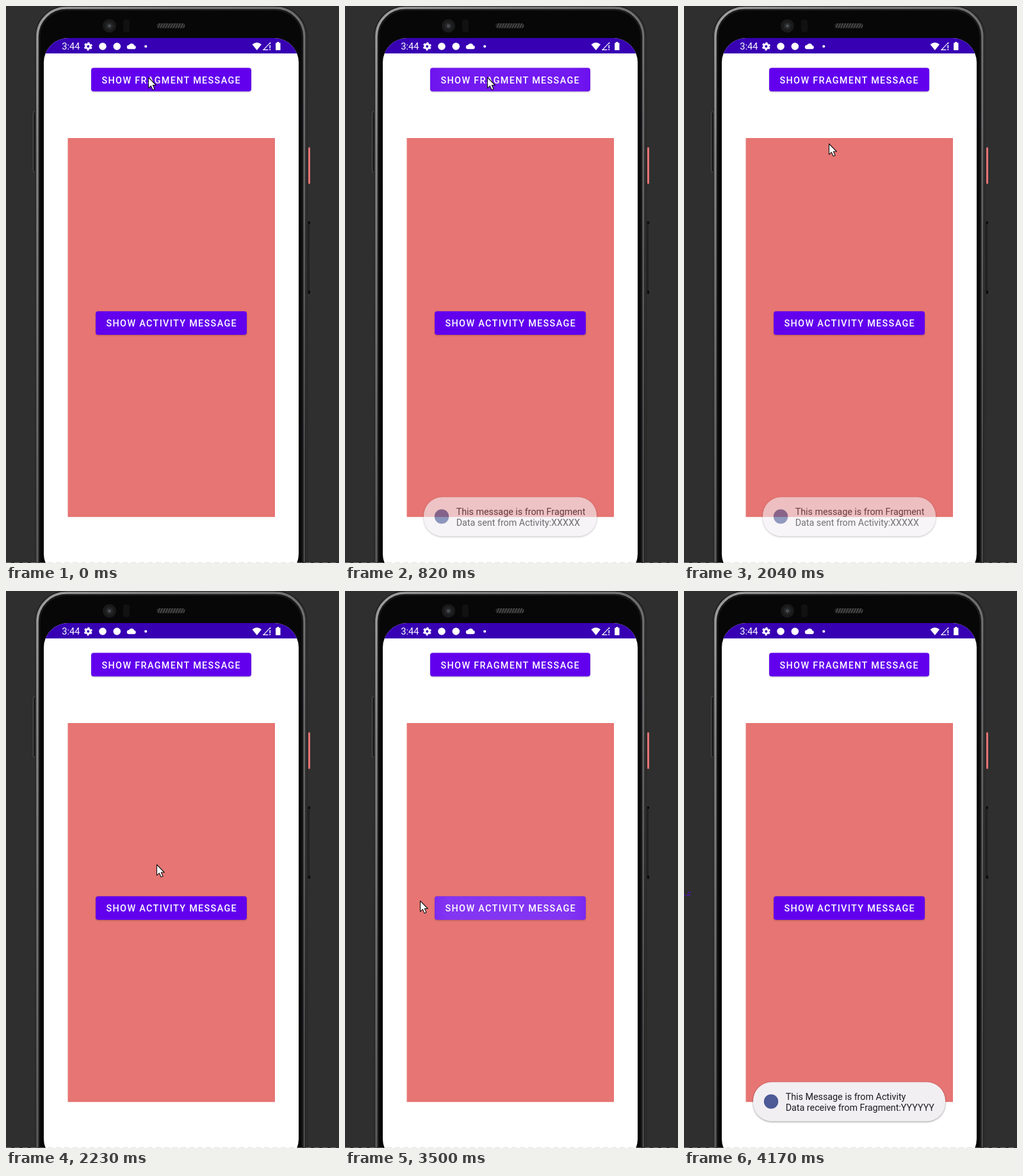
Recreate the animation shown at these times as an HTML page. Size 520 by 869 pixels, loop 5.28 s.

```html
<!DOCTYPE html>
<html lang="en">
<head>
<meta charset="utf-8">
<title>Fragment and activity messages</title>
<style>
  html, body { margin: 0; width: 100%; height: 100%; overflow: hidden; background: #2f2f2f; }
  svg { display: block; width: 520px; height: 869px; font-family: Roboto, sans-serif; }
  .label { font-size: 14.4px; font-weight: 500; letter-spacing: 1.34px; fill: #fff; }
  .toast text { font-size: 14.3px; fill: #1d1b20; }
  .toast rect { fill: #f2eff3; filter: drop-shadow(0 1px 1.5px rgba(0, 0, 0, .4)); }
  .icons { fill: #fff; }
</style>
</head>
<body>
<svg viewBox="0 0 520 869">
  <defs>
    <linearGradient id="metal" x2=".5" y2="1">
      <stop stop-color="#a0a0a0"/><stop offset=".2" stop-color="#808080"/>
      <stop offset=".5" stop-color="#686868"/><stop offset="1" stop-color="#444"/>
    </linearGradient>
    <pattern id="mesh" width="4" height="4" patternUnits="userSpaceOnUse" patternTransform="skewX(-25)">
      <rect width="4" height="4" fill="#1b1b1b"/><rect width="2" height="4" fill="#484848"/>
    </pattern>
    <clipPath id="screen"><rect x="59" y="50" width="398" height="843" rx="38"/></clipPath>
  </defs>

  <!-- phone body -->
  <rect width="520" height="869" fill="#2f2f2f"/>
  <rect x="42.5" y="165" width="3" height="94" rx="1.5" fill="#191919" stroke="#686868" stroke-width=".8"/>
  <rect x="472" y="220.5" width="3" height="57" rx="1" fill="#e57373"/>
  <rect x="471" y="336" width="3" height="113" fill="#222"/>
  <path d="M472 336h3v4h-3zM472 444h3v5h-3z" fill="#0c0c0c"/>
  <rect x="45" y="0" width="425.5" height="943" rx="49" fill="#070708"/>
  <rect x="46" y="1" width="423.5" height="940" rx="48" fill="none" stroke="#4c4c4c"/>
  <rect x="49" y="3" width="417" height="937" rx="45" fill="none" stroke="url(#metal)" stroke-width="3.6"/>
  <rect x="52.3" y="6.3" width="410.4" height="931" rx="42" fill="none" stroke="#1b1b1e" stroke-width="2"/>
  <circle cx="161.5" cy="31" r="10.5" fill="#1a1a1b"/>
  <circle cx="161.5" cy="31" r="6" fill="#252628"/>
  <circle cx="161.5" cy="31" r="2.6" fill="#4a4d52"/>
  <rect x="183" y="21" width="10" height="20" rx="4" fill="#111112"/>
  <rect x="235.5" y="27" width="44" height="7.5" rx="3.7" fill="url(#mesh)"/>

  <!-- screen -->
  <g clip-path="url(#screen)">
    <rect x="59" y="50" width="398" height="843" fill="#fff"/>
    <rect x="59" y="50" width="398" height="24" fill="#3700b3"/>
    <rect x="96.5" y="206" width="323.5" height="591.2" fill="#e67573"/>
  </g>
  <g class="icons">
    <text x="87.3" y="68.3" font-size="14.6">3:44</text>
    <circle cx="128.3" cy="63" r="3.5" fill="none" stroke="#fff" stroke-width="3"/>
    <circle cx="128.3" cy="63" r="5.6" fill="none" stroke="#fff" stroke-width="1.8" stroke-dasharray="3.1 2.764" stroke-dashoffset="-1.4"/>
    <circle cx="151" cy="63" r="5.8"/>
    <circle cx="173.3" cy="63" r="5.8"/>
    <path d="M192 67.3a3.1 3.1 0 0 1-.2-6.2 4.6 4.6 0 0 1 8.5.5 2.9 2.9 0 0 1 .3 5.7z"/>
    <circle cx="218.2" cy="63" r="2.1"/>
    <path d="M384.5 60Q391.8 53.8 399 60L391.8 69z"/>
    <path d="M409.5 68.4H402L412.6 57.4V59" fill="none" stroke="#fff" stroke-width="1.2"/>
    <path d="M411.5 61h1.5v5h-1.5zM411.5 67h1.5v2h-1.5z"/>
    <path d="M423.3 56h3v1.4h2.2V69h-7.4V57.4h2.2z"/>
  </g>
  <path d="M0 868.5H520" stroke="#c4c4c4" stroke-opacity=".5" stroke-dasharray="8 5"/>

  <g id="buttons"></g>
  <g id="toasts"></g>
  <path id="residue" d="M0 474.5l2-1M4 475.5l3-2M6 471l5-1.5M8 476l1-3" fill="none" stroke="#5a12e0" stroke-width="1.2"/>
  <path id="cursor" d="M0 0V16.6L3.9 13.1 6.6 19.2 9.5 17.9 6.8 12H11.8Z" fill="#fff" stroke="#111" stroke-width="1.1" stroke-linejoin="round"/>
</svg>
<script>
const LOOP = 5280;
const $ = id => document.getElementById(id);
const clamp = v => Math.min(1, Math.max(0, v));
const ramp = (t, from, to) => clamp((t - from) / (to - from));
const mix = (a, b, p) => a + (b - a) * p;

// Picture updates: [first time, count, interval]
const updates = [[0, 1, 0], [70, 7, 80], [620, 6, 82], [1360, 1, 0], [1970, 8, 65], [2500, 2, 70],
  [2760, 1, 0], [2900, 5, 67], [3370, 8, 65], [3970, 1, 0], [4170, 1, 0]]
  .flatMap(([start, count, step]) => Array.from({ length: count }, (_, i) => start + i * step));

const buttons = [
  { x: 133, y: 96.5, w: 250, text: 'SHOW FRAGMENT MESSAGE', pressX: 224, press: 40, fade: [520, 1040] },
  { x: 140, y: 476.3, w: 236, text: 'SHOW ACTIVITY MESSAGE', pressX: 238, press: 2900, fade: [3520, 3990] },
];
const toasts = [
  { x: 123, w: 270, lines: ['This message is from Fragment', 'Data sent from Activity:XXXXX'], show: [620, 1030], hide: [1930, 2200] },
  { x: 108, w: 300, lines: ['This Message is from Activity', 'Data receive from Fragment:YYYYYY'], show: [3550, 4120], hide: [LOOP, LOOP + 1] },
];
// Pointer tip: [time, x, y]
const pointer = [[1920, 222.5, 111.5], [1970, 224, 130], [2100, 229, 300], [2230, 235.5, 427], [2440, 236.5, 484],
  [2570, 238.5, 495], [3310, 238.5, 495], [3370, 200, 491], [3500, 117.5, 483.5], [3630, 5, 468], [3680, -20, 465]];

$('buttons').innerHTML = buttons.map(({ x, y, w, text }, i) => `
  <radialGradient id="ripple${i}" gradientUnits="userSpaceOnUse">
    <stop offset=".5" stop-color="#fff" stop-opacity=".21"/><stop offset="1" stop-color="#fff" stop-opacity="0"/>
  </radialGradient>
  <rect id="base${i}" x="${x}" y="${y}" width="${w}" height="36.7" rx="4" fill="#6200ee"/>
  <rect id="glow${i}" x="${x}" y="${y}" width="${w}" height="36.7" rx="4" fill="url(#ripple${i})"/>
  <text class="label" x="${x + 16.5}" y="${y + 24}">${text}</text>`).join('');

$('toasts').innerHTML = toasts.map(({ x, w, lines }, i) => `
  <g class="toast" id="toast${i}">
    <rect x="${x}" y="766.3" width="${w}" height="61" rx="29"/>
    <circle cx="${x + 28}" cy="796.5" r="11.2" fill="#4d5a96"/>
    ${lines.map((line, n) => `<text x="${x + 50.7}" y="${794 + n * 17}">${line}</text>`).join('')}
  </g>`).join('');

function drawButton({ x, y, w, pressX, press, fade }, i, t) {
  const age = t - press;
  const spread = 1 - (1 - ramp(age, 0, 600)) ** 1.4;
  const gradient = $('ripple' + i);
  gradient.setAttribute('cx', mix(pressX, x + w / 2, .35 + .5 * spread));
  gradient.setAttribute('cy', y + 18.35);
  gradient.setAttribute('r', 50 + 140 * spread);
  $('glow' + i).setAttribute('opacity', age < 0 ? 0 : 1 - ramp(t, ...fade));
  const lift = ramp(age, -1, 70) * (1 - ramp(age, 150, 400));
  $('base' + i).style.filter =
    `drop-shadow(0 ${mix(1, 3, lift)}px ${mix(1, 3.5, lift)}px rgba(0,0,0,${mix(.25, .4, lift)}))`;
}

function drawToast({ show, hide }, i, t) {
  const shown = 1 - (1 - ramp(t, ...show)) ** 2;
  $('toast' + i).setAttribute('opacity', shown * (1 - ramp(t, ...hide)));
}

function pointerAt(t) {
  const next = pointer.findIndex(([time]) => time > t);
  if (next === 0) return pointer[0].slice(1);
  if (next < 0) return pointer.at(-1).slice(1);
  const [a, b] = [pointer[next - 1], pointer[next]];
  const p = ramp(t, a[0], b[0]);
  return [mix(a[1], b[1], p), mix(a[2], b[2], p)];
}

function draw(now) {
  const t = updates.findLast(time => time <= now % LOOP);
  buttons.forEach((button, i) => drawButton(button, i, t));
  toasts.forEach((toast, i) => drawToast(toast, i, t));
  $('cursor').setAttribute('transform', `translate(${pointerAt(t)})`);
  $('residue').setAttribute('opacity', t > 3640 ? 1 : 0);
}

let start;
function tick(now) {
  start ??= now;
  draw(now - start);
  requestAnimationFrame(tick);
}
draw(0);
requestAnimationFrame(tick);
</script>
</body>
</html>
```
